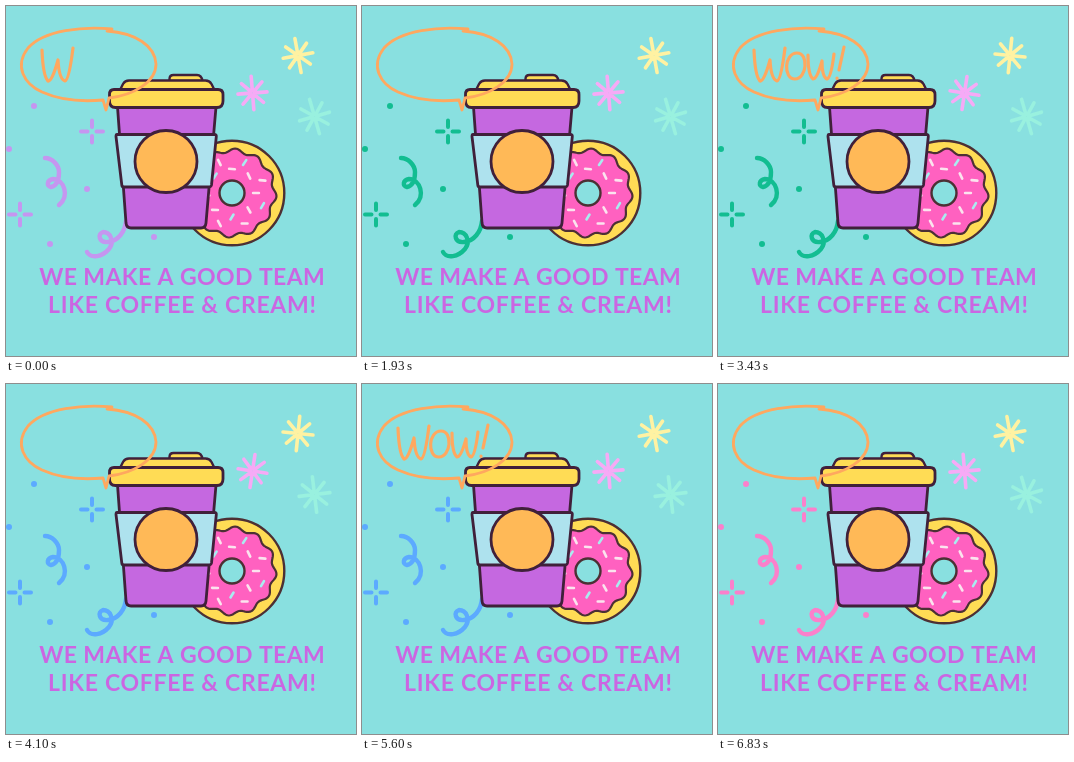
Animation of 350 by 350 pixels, one loop 6.86 s. Source, as an HTML page with a canvas:

```html
<!DOCTYPE html>
<html lang="en">
<head>
<meta charset="utf-8">
<title>Coffee and cream</title>
<style>
html, body { margin: 0; width: 100%; height: 100%; overflow: hidden; background: #89e0e0; }
canvas { display: block; width: 350px; height: 350px; }
</style>
</head>
<body>
<canvas id="stage"></canvas>
<script>
const LOOP = 6860, WORD = LOOP / 3, HUES = 517.5;
const BG = '#89e0e0', INK = '#40203a', BROWN = '#4c3034', YELLOW = '#ffdc55', ORANGE = '#ffa85f';
const canvas = document.getElementById('stage');
const g = canvas.getContext('2d');
const ratio = window.devicePixelRatio || 1;
canvas.width = canvas.height = 350 * ratio;

function shape(d, fill, line, width) {
  const p = new Path2D(d);
  if (fill) { g.fillStyle = fill; g.fill(p); }
  if (line) { g.strokeStyle = line; g.lineWidth = width; g.stroke(p); }
}

function disc(x, y, r, fill, line, width) {
  g.beginPath();
  g.arc(x, y, r, 0, Math.PI * 2);
  if (fill) { g.fillStyle = fill; g.fill(); }
  if (line) { g.strokeStyle = line; g.lineWidth = width; g.stroke(); }
}

// Start time within the colour cycle, colour
const hues = [
  [0, '#c596f0'], [45, '#fa90f3'], [85, '#fb80cb'],
  [122, '#ff8a4c'], [255, '#12bd91'], [425, '#5caaff']
];

function confetti(t) {
  const phase = t % HUES;
  const color = hues.filter(h => h[0] <= phase).pop()[1];
  for (const [x, y] of [[28, 100], [3, 143], [81, 183], [44, 238], [148, 231]]) disc(x, y, 3, color);
  for (const [x, y] of [[86, 125.5], [14, 208.5]]) {
    shape(`M${x - 11} ${y}h6.5M${x + 4.5} ${y}h6.5M${x} ${y - 11}v6.5M${x} ${y + 4.5}v6.5`, null, color, 4);
  }
  shape('M39 152C46 152 53 159 53 166C53 175 50 180 45 181C40 180 41 174 47 173C58 173 64 190 53 199', null, color, 4.4);
  shape('M81 246C85 253 96 251 103 243C109 235 104 226 97 226C91 228 93 237 102 236C112 235 119 226 120 215', null, color, 4.4);
}

function star(x, y, color, turn, size) {
  g.save();
  g.translate(x, y);
  g.rotate(turn);
  g.strokeStyle = color;
  g.lineWidth = 3.6;
  g.beginPath();
  for (let i = 0; i < 8; i++) {
    const a = i * Math.PI / 4, r = size * (i % 4 === 2 ? 1.08 : 0.94);
    g.moveTo(Math.cos(a) * 2, Math.sin(a) * 2);
    g.lineTo(Math.cos(a) * r, Math.sin(a) * r);
  }
  g.stroke();
  g.restore();
}

function stars(t) {
  const tilt = t % 600 < 340;
  star(292, 49.5, '#fff2a2', tilt ? -0.18 : 0.1, 16);
  star(246.5, 87, '#f6aaf6', tilt ? -0.08 : 0.15, 15.5);
  star(308.5, 110.5, '#99f1df', t % 480 < 200 ? -0.28 : -0.12, 16.5);
}

function donut() {
  const x = 226, y = 187;
  disc(x, y, 52.3, YELLOW, BROWN, 2.4);
  g.beginPath();
  for (let i = 0; i < 180; i++) {
    const a = i * Math.PI / 90;
    const r = 42.6 + 2 * Math.sin(12 * a + 0.6);
    g.lineTo(x + r * Math.cos(a), y + r * Math.sin(a));
  }
  g.closePath();
  g.fillStyle = '#ff61c0';
  g.fill();
  g.strokeStyle = BROWN;
  g.lineWidth = 2.2;
  g.stroke();
  const tints = ['#fbe3ee', '#a9ecef'];
  for (let i = 0; i < 16; i++) {
    const a = i * Math.PI / 8, r = i % 2 ? 33 : 24;
    const px = x + r * Math.cos(a), py = y + r * Math.sin(a), b = i * 2.1;
    const dx = 2.9 * Math.cos(b), dy = 2.9 * Math.sin(b);
    shape(`M${px - dx} ${py - dy}L${px + dx} ${py + dy}`, null, tints[i % 3 % 2], 2.6);
  }
  disc(x, y, 12.5, BG, BROWN, 2.4);
}

function cup() {
  shape('M111.5 101L120 217Q120.5 222 125 222H195Q199.5 222 200 217L210 101Z', '#c568e0', INK, 2.8);
  shape('M111 128.5H208.5Q210.5 128.5 210.3 130.5L205.5 179Q205 181 203 181H118Q116 181 115.8 179L110 130.5Q110 128.5 111 128.5Z', '#aee2ee', INK, 2.8);
  disc(160, 155.5, 31, '#ffb957', INK, 2.8);
  shape('M163.5 75V73Q163.5 69 167.5 69H191Q195.5 69 196.5 75Z', YELLOW, INK, 2.4);
  shape('M114 84L117 78Q119 74.5 123 74.5H199.5Q203.5 74.5 205.5 78L208.5 84Z', YELLOW, INK, 2.4);
  shape('M108 83.5H212Q217 83.5 217 88.5V95Q217 101.5 211 101.5H109.5Q103.5 101.5 103.5 95V88.5Q103.5 83.5 108 83.5Z', YELLOW, INK, 2.8);
}

// Letters of the shout, written one after another
const shout = [
  'M36 44Q37 70 42 75Q46 76 52 54Q53 73 59 75Q63 74 67 42',
  'M79 47C66 47 65 73 77 73C89 73 91 47 79 47',
  'M90 49Q90 69 95 73Q99 73 104 55Q104 71 109 73Q113 72 116 48',
  'M126 41L121 64M119 72v0.5'
];

function bubble(t) {
  shape('M106 23C78 20 38 24 22 42C8 60 18 78 36 86C54 94 76 96 97 94L100 104L103 92C128 89 150 76 150 58C149 40 130 27 101 25', null, ORANGE, 2.8);
  const step = Math.floor((t % WORD) / (WORD / 7));
  if (step < 5) shout.slice(0, step + 1).forEach(d => shape(d, null, ORANGE, 3.2));
}

function caption(text, y, gap) {
  g.letterSpacing = gap + 'px';
  g.fillText(text, 176 + gap / 2, y);
}

function draw(t) {
  g.setTransform(ratio, 0, 0, ratio, 0, 0);
  g.fillStyle = BG;
  g.fillRect(0, 0, 350, 350);
  g.lineCap = g.lineJoin = 'round';
  confetti(t);
  stars(t);
  donut();
  cup();
  bubble(t);
  g.font = '700 23px Lato, sans-serif';
  g.textAlign = 'center';
  g.fillStyle = '#cb66e2';
  caption('WE MAKE A GOOD TEAM', 279, 0.4);
  caption('LIKE COFFEE & CREAM!', 307, 0.7);
}

const start = performance.now();
function tick() {
  draw((performance.now() - start) % LOOP);
  requestAnimationFrame(tick);
}
tick();
</script>
</body>
</html>
```
